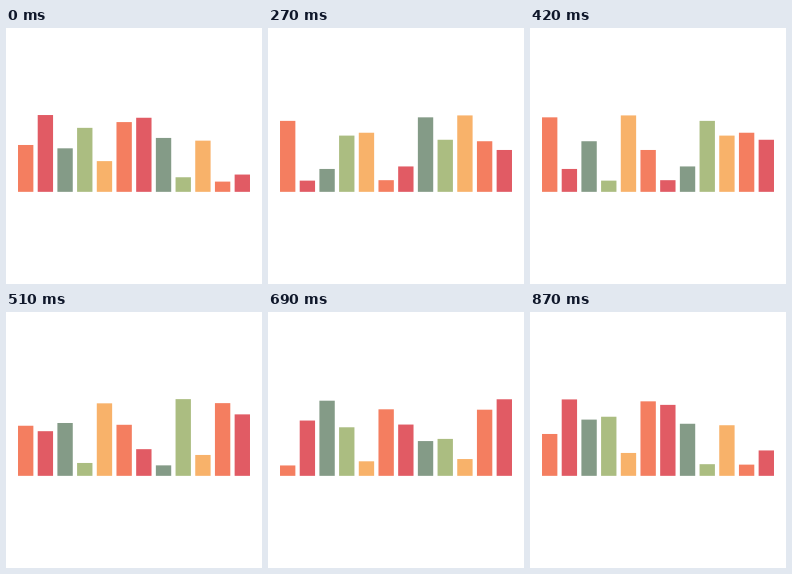
Animation, 256 px wide and 256 px high, one loop 0.9 s. Source, as an HTML page with a canvas:

```html
<!DOCTYPE html>
<html lang="en">
<head>
<meta charset="utf-8">
<title>Bouncing bars</title>
<style>
  html, body { margin: 0; width: 100%; height: 100%; overflow: hidden; background: #fff; }
  canvas { display: block; }
</style>
</head>
<body>
<canvas width="256" height="256"></canvas>
<script>
const ctx = document.querySelector('canvas').getContext('2d');
const LOOP = 900, STEP = 30;
const COLORS = ['#f47e60', '#e15b64', '#849b87', '#abbd81', '#f8b26a'];
const HEIGHTS = [20, 30, 4, 20];
// Head start of each bar, in twelfths of the loop
const PHASES = [11, 4, 6, 2, 10, 5, 3, 1, 9, 0, 8, 7];

// cubic-bezier(.5, 0, .5, 1), solved by bisection
function ease(x) {
  let lo = 0, hi = 1;
  for (let i = 0; i < 24; i++) {
    const s = (lo + hi) / 2;
    if (1.5 * s * (1 - s) + s ** 3 < x) lo = s; else hi = s;
  }
  return lo * lo * (3 - 2 * lo);
}

function barHeight(progress) {
  const pos = (progress % 1) * 3, i = Math.floor(pos);
  return HEIGHTS[i] + (HEIGHTS[i + 1] - HEIGHTS[i]) * ease(pos - i);
}

function draw() {
  // The picture advances in 30 ms steps; the small bias absorbs clock rounding
  const time = Math.floor((performance.now() + 1) / STEP) * STEP % LOOP;
  ctx.setTransform(1, 0, 0, 1, 0, 0);
  ctx.fillStyle = '#fff';
  ctx.fillRect(0, 0, 256, 256);
  ctx.scale(2.56, 2.56);
  PHASES.forEach((phase, i) => {
    const h = barHeight(time / LOOP + phase / 12);
    ctx.fillStyle = COLORS[i % COLORS.length];
    ctx.fillRect((i + 1) * 100 / 13 - 3, 64 - h, 6, h);
  });
  requestAnimationFrame(draw);
}
draw();
</script>
</body>
</html>
```
